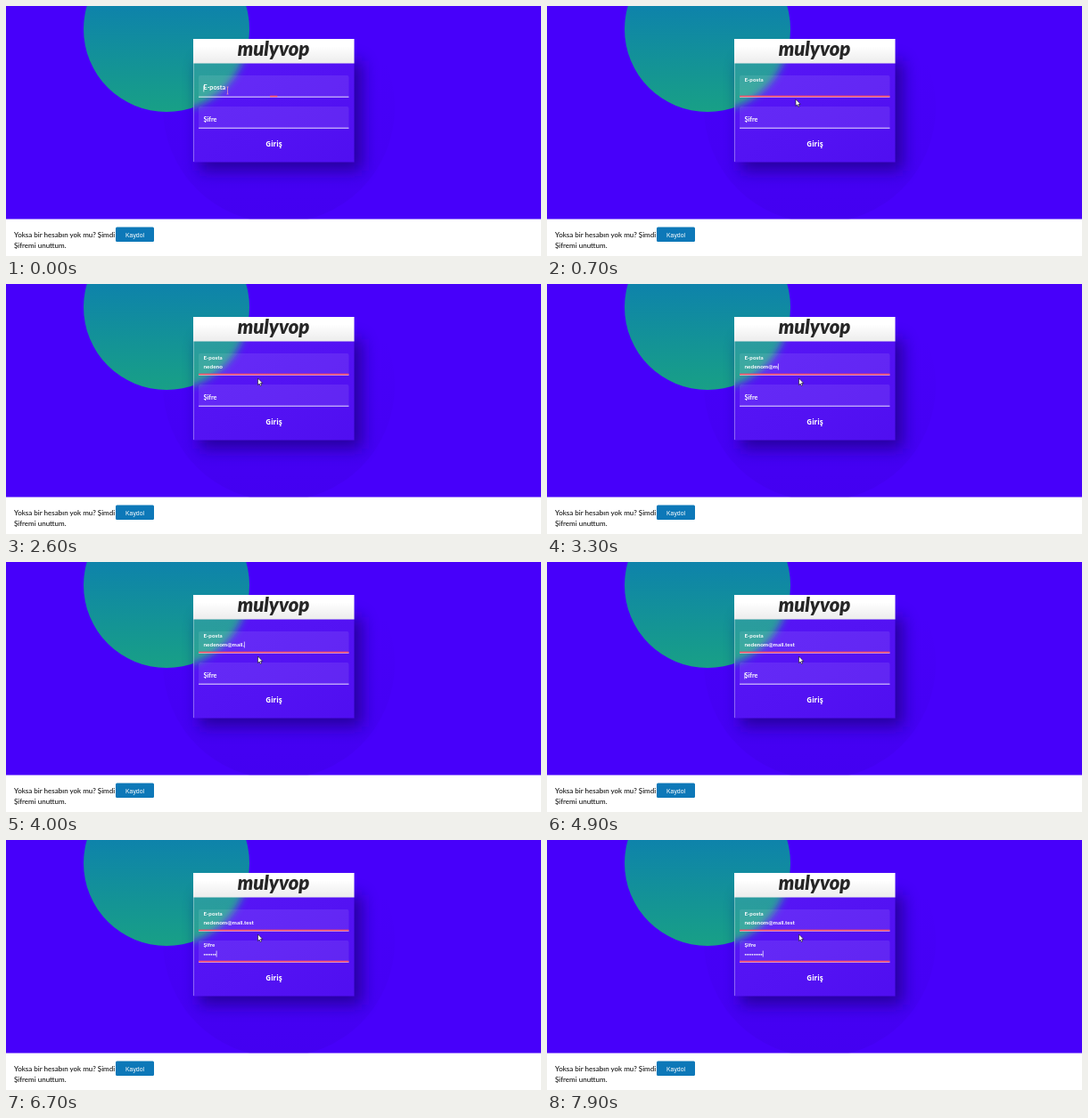
Recreate the animation shown at these times as an HTML page. Size 600x281 px, loop 8000 ms.

```html
<!DOCTYPE html>
<html lang="tr">
<head>
<meta charset="utf-8">
<title>Giriş</title>
<style>
  html, body { margin: 0; width: 100%; height: 100%; overflow: hidden; background: #fff; }
  svg { display: block; width: 600px; height: 281px; }
  text { font-family: Lato, "Open Sans", sans-serif; font-weight: 700; fill: #fff; }
  .note { font-size: 8px; font-weight: 500; fill: #111; }
  .value { font-size: 6.4px; }
  .dots { font-size: 3.5px; }
</style>
</head>
<body>
<svg viewBox="0 0 600 281">
  <defs>
    <linearGradient id="teal" x2="0" y2="1">
      <stop offset=".3" stop-color="#0d80ae"/>
      <stop offset="1" stop-color="#18a086"/>
    </linearGradient>
    <linearGradient id="halo" x2="0" y2="1">
      <stop offset=".3" stop-color="#3a00d8" stop-opacity="0"/>
      <stop offset="1" stop-color="#3a00d8" stop-opacity=".28"/>
    </linearGradient>
    <linearGradient id="glass" x2="1" y2="1">
      <stop stop-color="#fff" stop-opacity=".09"/>
      <stop offset="1" stop-color="#a090c0" stop-opacity=".1"/>
    </linearGradient>
    <linearGradient id="head" x2="0" y2="1">
      <stop offset=".3" stop-color="#fff"/>
      <stop offset="1" stop-color="#ececec"/>
    </linearGradient>
    <filter id="soft" x="-30%" y="-30%" width="160%" height="160%"><feGaussianBlur stdDeviation="4"/></filter>
    <filter id="shade" x="-30%" y="-30%" width="160%" height="160%"><feGaussianBlur stdDeviation="9"/></filter>
    <clipPath id="card"><rect x="210" y="37" width="180.500" height="138.500"/></clipPath>
    <clipPath id="hero"><rect width="600" height="239.500"/></clipPath>
  </defs>

  <g clip-path="url(#hero)">
    <rect width="600" height="240" fill="#4700fa"/>
    <circle cx="306" cy="114" r="130" fill="url(#halo)"/>
    <circle cx="180" cy="26" r="93" fill="url(#teal)"/>
    <rect x="217" y="62" width="182" height="123" fill="#1c0080" opacity=".75" filter="url(#shade)"/>
  </g>

  <g clip-path="url(#card)">
    <rect x="210" y="37" width="181" height="139" fill="#4700f6"/>
    <circle cx="180" cy="26" r="93" fill="url(#teal)" filter="url(#soft)"/>
    <rect x="210" y="37" width="181" height="139" fill="url(#glass)"/>
    <path d="M210.500 64V175" stroke="#fff" stroke-opacity=".35"/>
    <rect x="210" y="37" width="181" height="27.500" fill="url(#head)"/>
  </g>
  <text x="300" y="56" text-anchor="middle" font-size="22" font-style="italic" style="font-weight:900;fill:#262626">mulyvop</text>

  <g id="fields"></g>
  <text x="300.500" y="158" text-anchor="middle" font-size="8" style="font-family:'Noto Sans','Open Sans',sans-serif">Giriş</text>

  <text class="note" x="9" y="259.500">Yoksa bir hesabın yok mu? Şimdi</text>
  <text class="note" x="9" y="271.500">Şifremi unuttum.</text>
  <rect x="123" y="248.500" width="43" height="16.500" rx="1.500" fill="#0d78b8"/>
  <text x="144.500" y="259.500" text-anchor="middle" font-size="6.900" style="font-family:'Liberation Sans',Arial,sans-serif;font-weight:400">Kaydol</text>

  <path id="beam" d="M-1 -4h2M0 -4V4M-1 4h2" stroke="#f0a0b0" stroke-width=".7" fill="none"/>
  <path id="arrow" d="M0 0V7.500L1.700 6L2.900 8.500L4.100 8L3 5.500H5.300Z" fill="#fff" stroke="#111" stroke-width=".6"/>
</svg>
<script>
const LOOP = 8000, BLINK = 500;
const NS = "http://www.w3.org/2000/svg";
const $ = id => document.getElementById(id);
const clamp = v => Math.max(0, Math.min(1, v));
const mix = (a, b, p) => a + (b - a) * p;
const smooth = p => { p = clamp(p); return p * p * (3 - 2 * p); };

function add(parent, tag, attrs) {
  const el = document.createElementNS(NS, tag);
  for (const k in attrs) el.setAttribute(k, attrs[k]);
  return parent.appendChild(el);
}

function makeField(f) {
  const g = add($("fields"), "g", {});
  const y = f.top;
  add(g, "rect", { x: 216, y, width: 168.5, height: 24.5, rx: 2, fill: "#fff", "fill-opacity": .09 });
  add(g, "rect", { x: 216, y: y + 23.7, width: 168.5, height: 1, fill: "#fff", "fill-opacity": .85 });
  f.line = add(g, "rect", { y: y + 22.7, height: 1.6, fill: "#ff4f68" });
  f.text = add(g, "text", { x: 221.5, y: y + f.base, class: f.style });
  f.tag = add(g, "text", { x: 221.5 });
  f.tag.textContent = f.label;
  f.caret = add(g, "rect", { y: y + f.caretTop, width: .7, height: 7, fill: "#fff" });
  return f;
}

// keys: [time, characters typed so far], linear in between
const fields = [
  { label: "E-posta", top: 78, base: 17, caretTop: 11.5, style: "value", value: "nedenom@mail.test",
    focus: -40, blur: 4900, keys: [[900, 0], [1500, 4], [2000, 6], [2700, 6], [4000, 13], [4600, 17]] },
  { label: "Şifre", top: 113, base: 16.5, caretTop: 11.5, style: "dots", value: "•".repeat(10),
    focus: 4900, blur: LOOP, keys: [[5300, 0], [6700, 7], [7900, 10]] }
].map(makeField);

function typed(keys, t) {
  let n = 0;
  keys.forEach(([t1, n1], i) => {
    if (t < t1) return;
    const [t2, n2] = keys[i + 1] || [t1 + 1, n1];
    n = mix(n1, n2, clamp((t - t1) / (t2 - t1)));
  });
  return Math.floor(n + 1e-6);
}

// Time since the key that produced the n-th character
function sinceKey(f, n, t) {
  if (!n) return t - f.focus;
  const i = f.keys.findIndex(k => k[1] >= n);
  const [t1, n1] = f.keys[i - 1], [t2, n2] = f.keys[i];
  return t - mix(t1, t2, (n - n1) / (n2 - n1));
}

function drawField(f, t) {
  const p = smooth((t - f.focus) / 300);
  const n = typed(f.keys, t);
  f.line.setAttribute("x", 300.2 - 84.2 * p);
  f.line.setAttribute("width", 168.4 * p);
  f.tag.setAttribute("y", f.top + mix(16.5, 7.3, p));
  f.tag.setAttribute("font-size", mix(7.3, 6.2, p));
  f.text.textContent = f.value.slice(0, n);
  const width = n ? f.text.getComputedTextLength() : 0;
  f.caret.setAttribute("x", 221.5 + width);
  const on = t >= f.focus && t < f.blur && Math.floor(sinceKey(f, n, t) / BLINK) % 2 === 0;
  f.caret.setAttribute("opacity", on ? 1 : 0);
}

function drawPointer(t) {
  const p = smooth((t - 300) / 500);
  const x = mix(248.5, 282.5, p), y = mix(95, 106, p);
  const inside = y < 102;
  for (const [id, show] of [["beam", inside], ["arrow", !inside]]) {
    $(id).setAttribute("transform", `translate(${x} ${y})`);
    $(id).setAttribute("opacity", show ? 1 : 0);
  }
}

let start;
function frame(now) {
  start ??= now;
  const t = (now - start) % LOOP;
  fields.forEach(f => drawField(f, t));
  drawPointer(t);
  requestAnimationFrame(frame);
}
requestAnimationFrame(frame);
</script>
</body>
</html>
```
